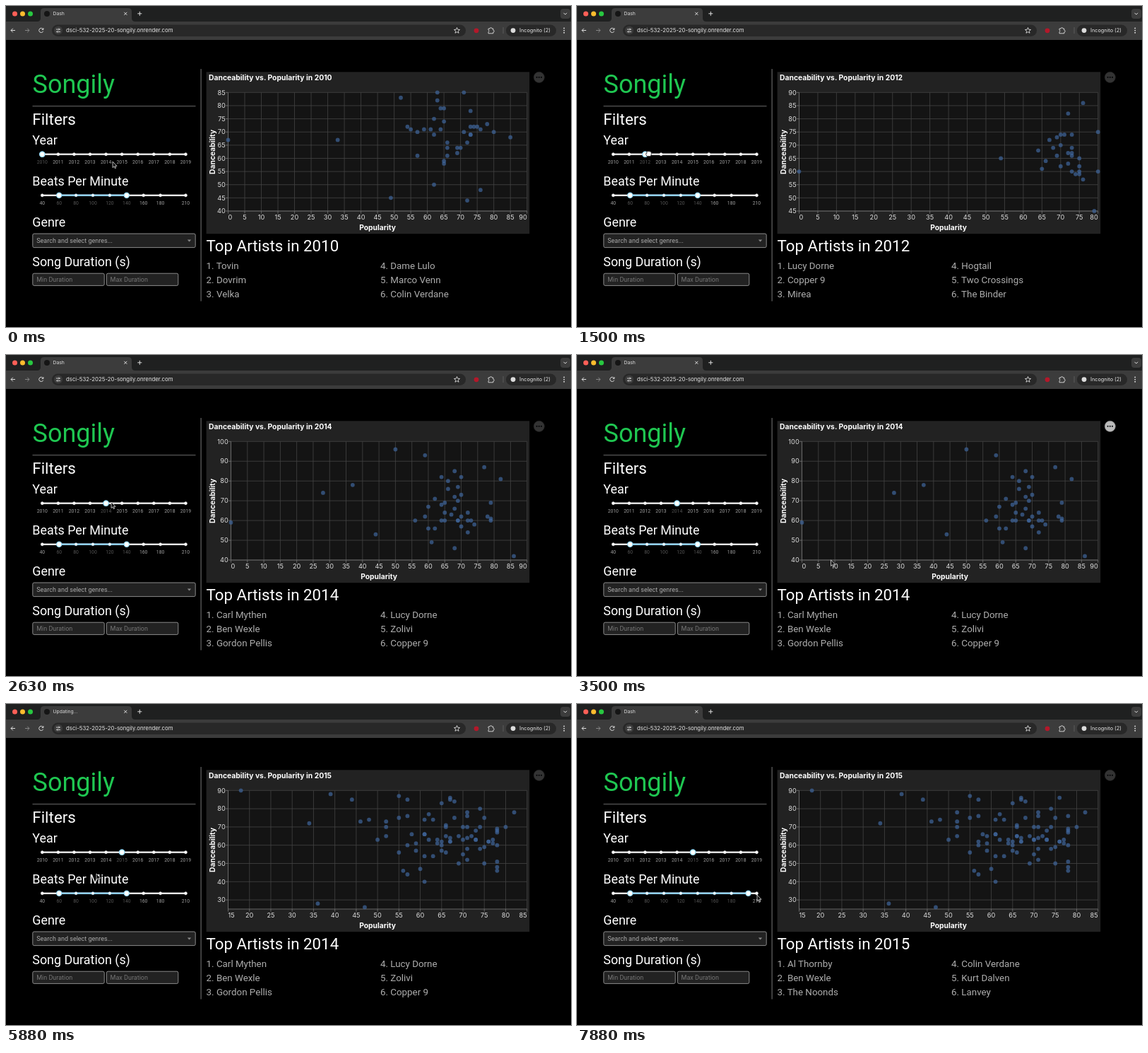
These frames come from a looping animation (800x454 px, 8 s). An HTML page:

```html
<!DOCTYPE html>
<html lang="en">
<head>
<meta charset="utf-8">
<title>Dash</title>
<style>
html, body { margin: 0; width: 100%; height: 100%; overflow: hidden; background: #000; }
svg { display: block; width: 800px; height: 454px; }
text { font-family: Roboto, sans-serif; white-space: pre; }
.ui text { font-family: Inter, sans-serif; }
</style>
</head>
<body>
<svg viewBox="0 0 800 454">
  <rect width="800" height="454" fill="#000"/>
  <g id="browser" class="ui"></g>
  <g id="sidebar"></g>
  <g id="sliders"></g>
  <g id="chart" class="ui"></g>
  <g id="menu">
    <circle cx="754.8" cy="100.8" r="7.6" fill="#fff" stroke="#aaa" stroke-width=".6"/>
    <path d="M751.6 100.8h0m3.2 0h0m3.2 0h0" stroke="#1b1e23" stroke-width="2.2" stroke-linecap="round"/>
  </g>
  <g id="artists"></g>
  <g id="cursor"></g>
</svg>
<script>
const LOOP = 8000, STEP = 125;
const $ = id => document.getElementById(id);

const text = (x, y, size, fill, str, extra = '') =>
  `<text x="${x}" y="${y}" font-size="${size}" fill="${fill}" ${extra}>${str}</text>`;
const rect = (x, y, w, h, fill, extra = '') =>
  `<rect x="${x}" y="${y}" width="${w}" height="${h}" fill="${fill}" ${extra}/>`;
const circle = (x, y, r, fill, extra = '') =>
  `<circle cx="${x}" cy="${y}" r="${r}" fill="${fill}" ${extra}/>`;
const stroke = (d, color, width = 1) =>
  `<path d="${d}" fill="none" stroke="${color}" stroke-width="${width}"/>`;

// A chart is one scattered crowd of songs plus a few that stand apart.
const charts = {
  2010: { x: [0, 90], y: [40, 85, 5], count: 36, mean: [67, 71], spread: [7, 6.5],
    apart: [[0, 67], [33, 67], [49, 45], [62, 50], [72, 44], [76, 48]] },
  2011: { x: [0, 90], y: [30, 85, 5], count: 38, mean: [68, 67], spread: [6, 5],
    apart: [[7, 80], [25, 64], [28, 50], [31, 73], [38, 77], [46, 30], [50, 35], [81, 42]] },
  2012: { x: [0, 80], y: [45, 90, 5], count: 26, mean: [71, 68], spread: [4.5, 6.5],
    apart: [[0, 60], [54, 65], [76, 86], [79, 45], [80, 60]] },
  2014: { x: [0, 90], y: [40, 100, 10], count: 38, mean: [68, 63], spread: [6.5, 9],
    apart: [[0, 59], [28, 74], [37, 78], [44, 53], [50, 96], [59, 93], [77, 87], [86, 42]] },
  2015: { x: [15, 85], y: [25, 90, 10], count: 78, fast: 7, mean: [68, 66], spread: [8.5, 12],
    apart: [[18, 90], [34, 72], [36, 28], [39, 88], [47, 26], [44, 85]] }
};

const topArtists = {
  2010: ['Tovin', 'Dovrim', 'Velka', 'Dame Lulo', 'Marco Venn', 'Colin Verdane'],
  2011: ['Valentina Dorsi', 'Mirea', 'Hogtail', 'Marco Venn', 'Marelle', 'Copper 9'],
  2012: ['Lucy Dorne', 'Copper 9', 'Mirea', 'Hogtail', 'Two Crossings', 'The Binder'],
  2013: ['Zolivi', 'Two Crossings', 'T!lt', 'The Binder', 'Tansy Orrel', 'Finnish Attic Guild'],
  2014: ['Carl Mythen', 'Ben Wexle', 'Gordon Pellis', 'Lucy Dorne', 'Zolivi', 'Copper 9'],
  2015: ['Al Thornby', 'Ben Wexle', 'The Noonds', 'Colin Verdane', 'Kurt Dalven', 'Lanvey']
};

// When each year is picked, and when its chart and artists arrive.
const picks = [
  { year: 2010, slider: 0, chart: 0, artists: 0 },
  { year: 2011, slider: 500, chart: 750, artists: 750 },
  { year: 2012, slider: 1250, chart: 1500, artists: 1500 },
  { year: 2013, slider: 1875, artists: 2125 },
  { year: 2014, slider: 2375, chart: 2500, artists: 2625 },
  { year: 2015, slider: 5500, chart: 5750, artists: 6250 }
];
const cursorPath = [
  [0, 151, 220], [500, 76, 210], [875, 77, 209], [2375, 142, 208], [2625, 149, 208], [4000, 450, 325],
  [4500, 441, 320], [5375, 165, 209], [5500, 165, 209], [5875, 128, 240], [6625, 171, 267], [7375, 242, 267],
  [7875, 255, 270]
];

const yearOf = (part, t) => picks.filter(p => p[part] <= t).pop().year;
const between = (t, from, to) => t >= from && t < to;
const yearX = year => 51.3 + (year - 2010) * 22.57;
const bpmX = bpm => 51.3 + (bpm - 40) * 1.195;

function cursorAt(t) {
  const i = cursorPath.findIndex(k => k[0] >= t);
  if (i < 1) return cursorPath[0].slice(1);
  const [t0, ...a] = cursorPath[i - 1], [t1, ...b] = cursorPath[i];
  const p = (t - t0) / (t1 - t0), ease = p * p * (3 - 2 * p);
  return a.map((v, k) => v + (b[k] - v) * ease);
}

function bpmAt(t) {
  if (t < 6625) return 140;
  const [x] = cursorAt(t);
  return Math.min(200, 40 + 20 * Math.round((x - bpmX(40)) / (bpmX(60) - bpmX(40))));
}

// The menu button fades in while the cursor rests on the chart.
function menuOpacity(t) {
  const hovers = [0, 125, 250].filter(ago => {
    const [x, y] = cursorAt(Math.max(0, t - ago));
    return x > 284 && y < 320;
  });
  return .2 + .8 * hovers.length / 3;
}

function seeded(seed) {
  return () => (seed = (seed * 16807) % 2147483647) / 2147483647;
}

function songs({ x, y, count, fast = 0, mean, spread, apart }, year, withFast) {
  const random = seeded(year * 7919);
  const bell = k => Math.round(mean[k] + spread[k] * 2 * (random() + random() + random() - 1.5));
  const clamp = (v, [low, high]) => Math.max(low, Math.min(high, v));
  const crowd = Array.from({ length: count + (withFast ? fast : 0) }, () => [clamp(bell(0), x), clamp(bell(1), y)]);
  return apart.concat(crowd);
}

function drawBrowser(title) {
  const light = '#dcdcdc';
  const star = Array.from({ length: 10 }, (_, i) => {
    const r = i % 2 ? 1.9 : 4.3, a = i * Math.PI / 5;
    return `${638.5 + r * Math.sin(a)} ${34.8 - r * Math.cos(a)}`;
  }).join('L');
  $('browser').innerHTML =
    rect(0, 0, 800, 24, '#1f2020') + rect(0, 22, 800, 26, '#3c3c3c') +
    '<path d="M44 22Q49 22 49 17V8Q49 3 54 3H173Q178 3 178 8V17Q178 22 183 22Z" fill="#3c3c3c"/>' +
    ['#ff5f57', '#febc2e', '#28c840'].map((c, i) => circle(12.5 + 11 * i, 11, 3.5, c)).join('') +
    circle(58, 11, 4, '#151515') + text(66.5, 13.4, 6.8, light, title) +
    stroke('M167.3 8.8l4 4m0-4l-4 4M186.3 10.8h6m-3-3v6', light) +
    rect(785, 4, 14, 14, '#3c3c3c', 'rx="4"') + stroke('M789.5 9.8l2.3 2.3 2.3-2.3', light) +
    rect(65, 26.5, 586, 16.5, '#282828', 'rx="8.2"') +
    stroke('M13 34.5H7m2.8-2.8L7 34.5l2.8 2.8', light) +
    stroke('M27 34.5h6m-2.8-2.8l2.8 2.8-2.8 2.8', '#858585') +
    stroke('M52.6 33A3.1 3.1 0 1 0 52.7 35.6M52.9 31.2V33.4H50.6', light) +
    circle(74, 34.6, 6, '#3c3c3c') +
    stroke('M71 33h2.6M75.6 33H77M71 36.4h1.4M74.4 36.4H77', light, .9) +
    circle(74.8, 33, .9, 'none', `stroke="${light}" stroke-width=".8"`) +
    circle(73.2, 36.4, .9, 'none', `stroke="${light}" stroke-width=".8"`) +
    text(85, 37.4, 7.8, '#e6e6e6', 'dsci-532-2025-20-songily.onrender.com') +
    stroke(`M${star}Z`, light, .9) + circle(666, 34.8, 3.4, '#b3182a') +
    stroke('M683 32h2.2a1.4 1.4 0 0 1 2.8 0h1.8v2.2a1.4 1.4 0 0 1 0 2.8v1.8H683v-2.2a1.4 1.4 0 0 0 0-2.6z', light, .9) +
    rect(703.5, 30, 1, 9, '#5a5a5a') + rect(708, 26.5, 71, 16.5, '#282828', 'rx="8.2"') +
    circle(718, 34.6, 3.4, light) + text(727, 37.3, 7.3, '#e6e6e6', 'Incognito (2)') +
    [31.4, 34.6, 37.8].map(y => circle(790.2, y, .95, light)).join('');
}

function drawSidebar() {
  const box = (x, y, w, h) => rect(x, y, w, h, '#222', 'rx="2" stroke="#999" stroke-width=".9"');
  const headings = [['Year', 196.4], ['Beats Per Minute', 254.4], ['Genre', 312.2], ['Song Duration (s)', 368.4]];
  $('sidebar').innerHTML =
    text(37.5, 123, 36, '#1fc751', 'Songily') +
    rect(37.5, 140.8, 231, 1.6, '#484848') + rect(275.3, 89, 1.7, 328.5, '#484848') +
    text(37.3, 168, 22.4, '#fff', 'Filters') +
    headings.map(([label, y]) => text(37.3, y, 17.9, '#fff', label)).join('') +
    box(37.8, 322, 230.4, 19.6) + text(43.2, 335, 9, '#aaa', 'Search and select genres...') +
    '<path d="M256.8 330.6h5.4l-2.7 2.8z" fill="#888"/>' +
    box(37.8, 378.2, 101.4, 17.2) + box(142.4, 378.2, 101.4, 17.2) +
    text(43.2, 390.2, 9, '#757575', 'Min Duration') + text(147.6, 390.2, 9, '#757575', 'Max Duration');
}

function drawSlider(y, marks, place, low, high) {
  const active = v => v >= low && v <= high;
  const bar = (from, to, color) => rect(place(from), y - 1.2, place(to) - place(from), 2.4, color);
  return bar(marks[0], marks[marks.length - 1], '#e9e9e9') + bar(low, high, '#8fd0f8') +
    marks.map(v => circle(place(v), y, 2, '#fff', `stroke="${active(v) ? '#a5dcfa' : '#e9e9e9'}" stroke-width=".7"`) +
      text(place(v), y + 13.4, 6.8, active(v) ? '#555' : '#a0a0a0', v, 'text-anchor="middle"')).join('') +
    [low, high].map(v => circle(place(v), y, 3.6, '#fff', 'stroke="#96dbfa" stroke-width="1.2"')).join('');
}

function drawSliders(year, bpm) {
  const years = Array.from({ length: 10 }, (_, i) => 2010 + i);
  const beats = Array.from({ length: 8 }, (_, i) => 40 + 20 * i).concat(210);
  $('sliders').innerHTML =
    drawSlider(209.7, years, yearX, year, year) + drawSlider(267.8, beats, bpmX, 60, bpm);
}

function drawChart(year, withFast) {
  const chart = charts[year], [x0, x1] = chart.x, [y0, y1, yStep] = chart.y;
  const left = y1 > 99 ? 318.5 : 314.5, right = 737.7, top = 122.3, bottom = 290;
  const px = v => left + (v - x0) / (x1 - x0) * (right - left);
  const py = v => bottom - (v - y0) / (y1 - y0) * (bottom - top);
  let grid = '', ticks = '', labels = '';
  for (let v = x0; v <= x1; v += 5) {
    grid += `M${px(v)} ${top}V${bottom}`;
    ticks += `M${px(v)} ${bottom}v3.6`;
    const anchor = v === x0 ? 'start' : v === x1 ? 'end' : 'middle';
    labels += text(px(v), 301.8, 9.2, '#ddd', v, `text-anchor="${anchor}"`);
  }
  for (let v = Math.ceil(y0 / yStep) * yStep; v <= y1; v += yStep) {
    grid += `M${left} ${py(v)}H${right}`;
    ticks += `M${left} ${py(v)}h-3.6`;
    labels += text(left - 3.8, py(v) + 3.2, 9.2, '#ddd', v, 'text-anchor="end"');
  }
  const dots = songs(chart, year, withFast)
    .map(([x, y]) => circle(px(x), py(y), 2.9, '#3e659b', 'opacity=".7"')).join('');
  const bold = 'font-weight="700"', centred = bold + ' text-anchor="middle"';
  $('chart').innerHTML =
    rect(283.6, 93.3, 457.6, 228.9, '#222') + rect(left, top, right - left, bottom - top, '#141414') +
    stroke(grid, '#444', .8) + stroke(ticks + `M${left} ${top}V${bottom}H${right}`, '#777', .8) + labels + dots +
    text(287, 104.6, 10.35, '#fff', `Danceability vs. Popularity in ${year}`, bold) +
    text((left + right) / 2, 317.2, 10.3, '#fff', 'Popularity', centred) +
    text(0, 0, 10.3, '#fff', 'Danceability', centred + ' transform="translate(296.4 206.3) rotate(-90)"');
}

function drawArtists(year) {
  $('artists').innerHTML = text(283.6, 347, 22.3, '#fff', `Top Artists in ${year}`) +
    topArtists[year].map((name, i) =>
      text(i < 3 ? 283.6 : 530, 372 + i % 3 * 20, 13.35, '#adadad', `${i + 1}. ${name}`)).join('');
}

const arrow = '<path d="M0 0V8.6L2 6.8 3.3 9.7 4.7 9.1 3.4 6.3H6Z" fill="#111" stroke="#ddd" stroke-width=".8"/>';
const hand = '<path d="M-2.6 3.8L-4 .8Q-4-.8-2.6-.2V-2.4Q-1.9-4-1-2.6Q0-4.2 1-2.6Q2-3.6 2.6-2.1Q3.8-2.5 3.8-1V1.4L2.6 3.8Z" fill="#fff" stroke="#222" stroke-width=".8"/>';

function draw(t) {
  const updating = picks.some(p => between(t, p.slider, p.artists));
  const dragging = between(t, 1000, 2500) || between(t, 6625, 7500);
  drawBrowser(updating && yearOf('slider', t) !== 2013 ? 'Updating...' : 'Dash');
  drawSliders(yearOf('slider', t), bpmAt(t));
  drawChart(yearOf('chart', t), t >= 7625);
  drawArtists(yearOf('artists', t));
  $('menu').setAttribute('opacity', menuOpacity(t));
  $('cursor').innerHTML = dragging ? hand : arrow;
  $('cursor').setAttribute('transform', `translate(${cursorAt(t)})`);
}

drawSidebar();
const began = performance.now();
let shown = -1;
function tick() {
  const step = Math.floor((performance.now() - began) % LOOP / STEP);
  if (step !== shown) draw((shown = step) * STEP);
  requestAnimationFrame(tick);
}
tick();
</script>
</body>
</html>
```
